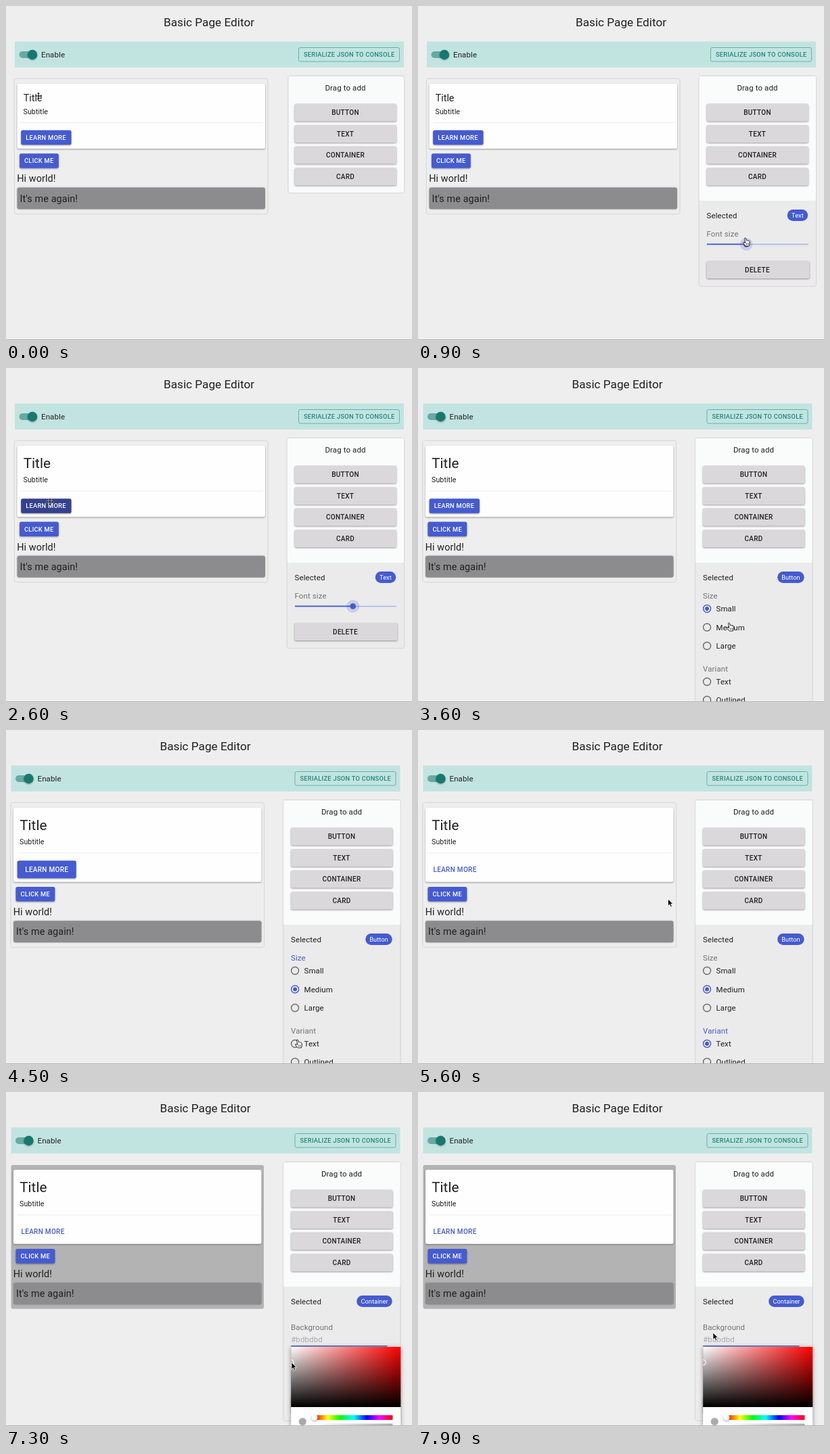
These frames come from a looping animation (600x494 px, 8 s). An HTML page:

```html
<!DOCTYPE html>
<html lang="en">
<head>
<meta charset="utf-8">
<title>Basic Page Editor</title>
<style>
html, body { margin: 0; width: 100%; height: 100%; overflow: hidden; background: #efeeef; }
svg { display: block; width: 600px; height: 494px; }
text { font-family: Roboto, "Liberation Sans", sans-serif; white-space: pre; }
.raised { filter: drop-shadow(0 1px 1px rgba(0,0,0,.38)); }
.soft { filter: drop-shadow(0 .7px 1px rgba(0,0,0,.25)); }
</style>
</head>
<body>
<svg id="stage" viewBox="0 0 600 494" xmlns="http://www.w3.org/2000/svg">
  <defs>
    <linearGradient id="white"><stop stop-color="#fff"/><stop offset="1" stop-color="#fff" stop-opacity="0"/></linearGradient>
    <linearGradient id="black" x2="0" y2="1"><stop stop-color="#000" stop-opacity="0"/><stop offset="1"/></linearGradient>
    <linearGradient id="hue">
      <stop stop-color="#f00"/><stop offset=".17" stop-color="#ff0"/><stop offset=".33" stop-color="#0f0"/>
      <stop offset=".5" stop-color="#0ff"/><stop offset=".67" stop-color="#00f"/><stop offset=".83" stop-color="#f0f"/>
      <stop offset="1" stop-color="#f00"/>
    </linearGradient>
    <linearGradient id="alpha"><stop stop-color="#fff"/><stop offset="1" stop-color="#aaa"/></linearGradient>
  </defs>
  <g id="scene"></g>
</svg>
<script>
const scene = document.getElementById('scene');
const LOOP = 8000, STEP = 100;
const INK = '#202021', GREY = '#757476', BLUE = '#455bd0', TEAL = '#16796d';
const BODY = 11.5, SMALL = 9.3, MEDIUM = 10.02, LARGE = 14.4;

const at = {
  selectText: 300, slideFrom: 1000, slideTo: 1800, hoverButton: 2500, selectButton: 2700,
  medium: 3800, variantText: 4700, selectContainer: 5800, openPicker: 6400, pickColor: 7100
};

// time, x, y, pointer shape used from that time on
const path = [
  [0, 48, 133, 'move'], [200, 48, 133, 'move'], [400, 200, 208, 'arrow'], [800, 485, 349, 'hand'],
  [1000, 485, 349, 'hand'], [1800, 512, 349, 'hand'], [1900, 512, 349, 'arrow'],
  [2500, 65, 198, 'move'], [2800, 65, 198, 'arrow'], [3500, 461, 383, 'hand'],
  [3900, 461, 383, 'hand'], [4400, 432, 464, 'hand'], [4900, 432, 464, 'arrow'],
  [5500, 369.5, 250, 'arrow'], [5900, 369.5, 250, 'arrow'], [6400, 441, 371, 'arrow'],
  [6600, 441, 371, 'arrow'], [7100, 422, 400, 'arrow'], [7500, 422, 400, 'arrow'], [7900, 436, 356, 'arrow']
];

const clamp01 = v => Math.max(0, Math.min(1, v));
const ease = p => p * p * (3 - 2 * p);

function pointerAt(t) {
  let i = path.length - 1;
  while (path[i][0] > t) i--;
  const a = path[i], b = path[i + 1] || a;
  const p = b === a ? 0 : ease((t - a[0]) / (b[0] - a[0]));
  return { x: a[1] + (b[1] - a[1]) * p, y: a[2] + (b[2] - a[2]) * p, shape: a[3] };
}

const rect = (x, y, w, h, fill, r = 0, more = '') =>
  `<rect x="${x}" y="${y}" width="${w}" height="${h}" rx="${r}" fill="${fill}" ${more}/>`;
const circle = (x, y, r, fill, more = '') => `<circle cx="${x}" cy="${y}" r="${r}" fill="${fill}" ${more}/>`;
const line = (x1, x2, y, color, width = 1, more = '') =>
  `<path d="M${x1} ${y}H${x2}" stroke="${color}" stroke-width="${width}" ${more}/>`;
const group = (x, y, content) => `<g transform="translate(${x} ${y})">${content}</g>`;

// y is the middle of the capital letters
const text = (x, y, s, size = BODY, fill = INK, more = '') =>
  `<text x="${x}" y="${y + size * 0.355}" font-size="${size}" fill="${fill}" ${more}>${s}</text>`;
const spaced = (x, y, s, fill = INK, more = '') => text(x, y, s, BODY, fill, 'letter-spacing=".1" ' + more);
const caps = (x, y, s, size, fill, more = '') =>
  text(x, y, s, size, fill, `font-weight="500" letter-spacing="${size * 0.0286}" ` + more);
const CENTER = 'text-anchor="middle"';

const greyButton = (y, label, w = 150.5) =>
  rect(426.5, y - 13, w, 26, '#dad8da', 2.5, 'class="raised"') + caps(501.5, y, label, MEDIUM, INK, CENTER);

const blueButton = (x, y, w, label, size = SMALL, pad = 7, fill = BLUE) => {
  const h = size === SMALL ? 21.5 : 26;
  return rect(x, y - h / 2, w, h, fill, 2.5, 'class="raised"') + caps(x + pad, y, label, size, '#fff');
};

const chip = (label, w) =>
  rect(576.2 - w, 301, w, 17, BLUE, 8.5) + text(576.2 - w / 2, 309.5, label, SMALL, '#fff', CENTER);

const radio = (y, label, on) =>
  circle(432.6, y, 5.5, 'none', `stroke="${on ? BLUE : '#6c6b6d'}" stroke-width="1.4"`) +
  (on ? circle(432.6, y, 2.9, BLUE) : '') + spaced(446, y, label);

function header() {
  return text(300, 24, 'Basic Page Editor', 17.2, INK, CENTER) +
    rect(13, 52.5, 575, 38.5, '#c2e4e1') +
    rect(19.5, 67, 25, 10, '#66aaa3', 5) + circle(39, 72, 7.2, TEAL, 'class="raised"') +
    spaced(52, 72, 'Enable') +
    rect(432.5, 61.5, 149, 20.5, 'none', 2.5, 'stroke="#66b0a8"') +
    caps(507.2, 72, 'SERIALIZE JSON TO CONSOLE', SMALL, '#20877c', CENTER);
}

function editor(t, fontSize) {
  const grow = (fontSize - 20) * 1.04;
  const big = t >= at.medium, flat = t >= at.variantText;
  const drop = grow + (big ? 4.3 : 0);
  const filled = t >= at.pickColor;
  const hover = t >= at.hoverButton && t <= at.selectButton + 100;
  const learnY = 194.6 + grow + (big ? 2.2 : 0);
  const learn = flat ? caps(28, learnY, 'LEARN MORE', MEDIUM, BLUE)
    : big ? blueButton(22.2, learnY, 87, 'LEARN MORE', MEDIUM, 11.5)
    : blueButton(22.2, learnY, 74.3, 'LEARN MORE', SMALL, 7, hover ? '#34418f' : BLUE);
  const size = fontSize * 0.716;
  return rect(13, 108, 373.5, 199 + drop, filled ? '#b4b3b4' : '#efeeef', 3, filled ? '' : 'class="soft"') +
    rect(16.5, 115, 366.5, 96 + drop, '#fefefe', 2.5, 'class="raised"') +
    text(25.7, 135.9 + grow * 0.5, 'Title', size) +
    text(25.5, 155.9 + grow, 'Subtitle', 10.7, INK, 'letter-spacing=".05"') +
    line(22, 380, 172.6 + grow, '#ecebec') + learn +
    group(0, drop,
      blueButton(20, 229, 57.8, 'CLICK ME') +
      text(16.2, 255.2, 'Hi world!', LARGE, INK, 'letter-spacing=".1"') +
      rect(16.5, 268.5, 366.5, 32, '#8c8b8d', 3, 'class="soft"') +
      text(20.5, 284.6, "It's me again!", LARGE, INK, 'letter-spacing=".1"'));
}

function fontSettings(fontSize) {
  const x = 427 + (fontSize - 1) / 49 * 150;
  return chip('Text', 30.5) + spaced(426.5, 337, 'Font size', GREY) +
    line(427, 577, 352.4, '#a9b4ea', 1.5) + line(427, x, 352.4, BLUE, 1.7) +
    circle(x, 352.4, 9.5, BLUE, 'opacity=".2"') + circle(x, 352.4, 4.3, BLUE) +
    greyButton(390, 'DELETE', 152);
}

function buttonSettings(t) {
  const big = t >= at.medium, flat = t >= at.variantText;
  return chip('Button', 39.5) +
    spaced(426.5, 337, 'Size', big && !flat ? BLUE : GREY) +
    radio(356, 'Small', !big) + radio(383.5, 'Medium', big) + radio(411, 'Large', false) +
    spaced(426.5, 444.5, 'Variant', flat ? BLUE : GREY) +
    radio(464, 'Text', flat) + radio(491, 'Outlined', false);
}

function picker(picked) {
  return rect(426.7, 377, 162, 125, '#fff', 1, 'class="soft" style="filter:drop-shadow(0 1px 3px rgba(0,0,0,.4))"') +
    ['#f00', 'url(#white)', 'url(#black)'].map(fill => rect(426.7, 377, 162, 89, fill)).join('') +
    (picked ? '<path d="M426.7 396a4 4 0 0 1 0 8" fill="none" stroke="#fff" stroke-width="1.2"/>' : '') +
    circle(443.8, 487.5, 5.5, picked ? '#aaa' : '#eee', 'stroke="#ccc" stroke-width=".6"') +
    rect(461.5, 478, 115.5, 7, 'url(#hue)', 1) +
    circle(461.5, 481.5, 4.5, '#fdfdfd', 'class="raised"') +
    (picked ? rect(461.5, 490.5, 115.5, 6, 'url(#alpha)', 1)
      : line(461.5, 577, 492.5, '#e4e3e4', 3, 'stroke-dasharray="3 3"'));
}

function containerSettings(t) {
  const open = t >= at.openPicker, picked = t >= at.pickColor;
  return chip('Container', 52.5) + spaced(426.5, 348.3, 'Background', GREY) +
    (picked ? spaced(426.7, 365.5, '#bdbdbd', '#aaa9ab') : '') +
    line(426.7, 569, 375.8, open ? BLUE : '#929193', open ? 1.5 : 0.8) +
    (open && !picked ? line(434, 471, 371, '#ef4c3d', 1.5, 'stroke-dasharray="2.2 1"') : '') +
    greyButton(462, 'DELETE', 152) + (open ? picker(picked) : '');
}

function sidebar(t, fontSize) {
  const selected = t >= at.selectText;
  const bottom = !selected ? 276 : t < at.selectButton ? 414 : t < at.selectContainer ? 520 : 486;
  const left = selected ? 415.8 : 417.5;
  let out = rect(left, 104, 588 - left, bottom - 104, selected ? '#ebebeb' : '#f9fbfb', 3, 'class="soft"');
  if (selected) out += rect(left, 104, 588 - left, 184, '#f9fcfb', 2);
  out += spaced(501.5, 121.3, 'Drag to add', INK, CENTER);
  ['BUTTON', 'TEXT', 'CONTAINER', 'CARD'].forEach((label, i) => out += greyButton(157.4 + i * 31.6, label));
  if (!selected) return out;
  out += spaced(426.5, 309.5, 'Selected');
  if (t < at.selectButton) return out + fontSettings(fontSize);
  return out + (t < at.selectContainer ? buttonSettings(t) : containerSettings(t));
}

const pointers = {
  arrow: '<path d="M0 0V10.2L2.4 8L4 11.7L5.8 10.9L4.2 7.3H7.3Z" fill="#000" stroke="#fff" stroke-width=".8"/>',
  move: '<path d="M0-5.5L2.2-3H.8V-.8H3V-2.2L5.5 0L3 2.2V.8H.8V3H2.2L0 5.5L-2.2 3H-.8V.8H-3V2.2L-5.5 0L-3-2.2V-.8H-.8V-3H-2.2Z" fill="#000" stroke="#fff" stroke-width=".5"/>',
  hand: '<path d="M-2.4-5.6Q-1.2-7-.5-5.3L.5-2.2Q1.6-3 2.2-2Q3.4-2.6 3.8-1.4Q5-1.7 5.2-.3L5.4 2.6L4.4 6H-.8L-4.5 1.8Q-4.8 0-2.8.8L-1.3 1.7Z" fill="#fff" stroke="#111" stroke-width=".9"/><path d="M.4 1.5V4.3M2 1.5V4.3M3.6 1.5V4.3" stroke="#111" stroke-width=".6"/>'
};

function draw(t) {
  const slide = clamp01((t - at.slideFrom) / (at.slideTo - at.slideFrom));
  const fontSize = Math.round(20 + 9 * ease(slide));
  const scrollbar = t >= at.selectButton ? -5.5 : 0;
  const p = pointerAt(t);
  scene.innerHTML = rect(0, 0, 600, 494, '#efeeef') +
    group(scrollbar, 0, header() + editor(t, fontSize) + sidebar(t, fontSize)) +
    line(0, 600, 493.5, '#b5b4b6') + group(p.x, p.y, pointers[p.shape]);
}

const start = performance.now();
let shown = -1;
function tick() {
  const t = Math.floor((performance.now() - start) % LOOP / STEP) * STEP;
  if (t !== shown) draw(shown = t);
  requestAnimationFrame(tick);
}
tick();
</script>
</body>
</html>
```
